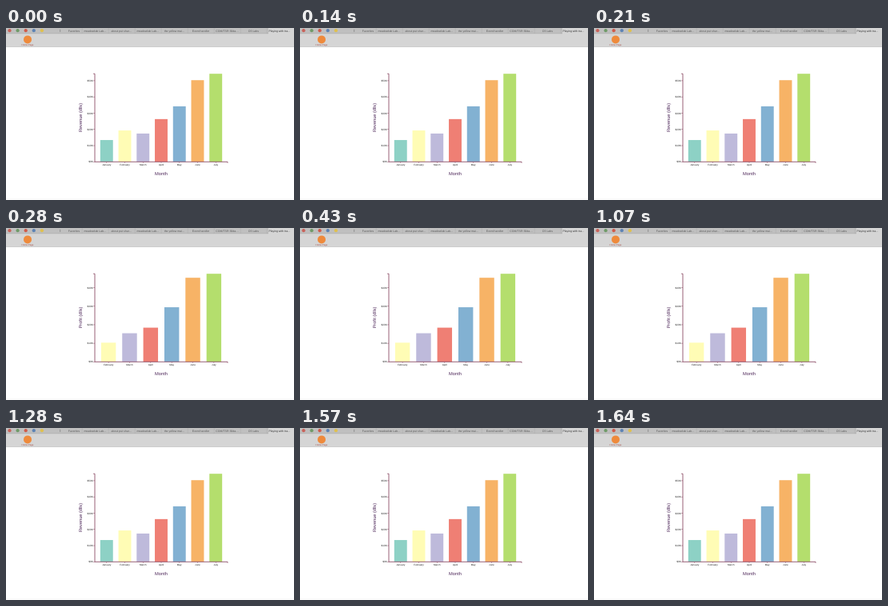
Recreate the animation shown at these times as an HTML page. Size 360 px wide and 215 px high, loop 1.93 s.

```html
<!DOCTYPE html>
<html lang="en">
<head>
<meta charset="utf-8">
<title>Monthly chart</title>
<style>
html, body { margin: 0; width: 100%; height: 100%; overflow: hidden; background: #fff; }
svg { display: block; width: 100vw; height: 100vh; }
text { font-family: "Liberation Sans", Arial, sans-serif; text-rendering: geometricPrecision; }
</style>
</head>
<body>
<svg id="stage" viewBox="0 0 360 215">
  <g id="browser"></g>
  <g id="chart"></g>
</svg>
<script>
const LOOP = 1930, TO_PROFIT = 280, TO_REVENUE = 1280;
const LEFT = 111, RIGHT = 277, TOP = 57.2, BASE = 167.3;
const AXIS = '#8d5068', INK = '#4b2457';

const months = ['January', 'February', 'March', 'April', 'May', 'June', 'July'];
const colors = ['#8dd1c5', '#fffcb5', '#bebadb', '#ef7f74', '#82b1d2', '#f7b366', '#b4de6d'];
const modes = {
  revenue: { title: 'Revenue (dlls)', first: 0, data: [13432, 19342, 17443, 26342, 34213, 50321, 54273] },
  profit: { title: 'Profit (dlls)', first: 1, data: [10342, 15423, 18432, 29434, 45343, 47492] }
};

function add(parent, tag, attrs, content) {
  const el = document.createElementNS('http://www.w3.org/2000/svg', tag);
  for (const key in attrs) el.setAttribute(key, attrs[key]);
  if (content) el.textContent = content;
  parent.appendChild(el);
  return el;
}
const rect = (g, x, y, width, height, fill) => add(g, 'rect', { x, y, width, height, fill });
const label = (g, x, y, size, text, fill, anchor = 'middle') =>
  add(g, 'text', { x, y, 'font-size': size, 'text-anchor': anchor, fill }, text);

function drawBrowser(g) {
  rect(g, 0, 0, 360, 215, '#fff');
  rect(g, 0, 0, 360, 24, '#d5d5d5');
  rect(g, 0, 0, 328, 7, '#bfbfbf');
  rect(g, 0, 6.6, 328, 0.6, '#a9a9a9');
  rect(g, 0, 23.4, 360, 0.6, '#c9c9c9');
  rect(g, 0, 213.6, 360, 0.6, '#f1f1ef');

  ['#c9625a', '#6f9b68', '#cf5a4a', '#5d83b5', '#dfc04e'].forEach((fill, i) =>
    add(g, 'circle', { cx: 4.5 + i * 10.1, cy: 3.2, r: 2.1, fill }));
  rect(g, 67.5, 1.8, 0.6, 3.2, '#777');

  const tabs = ['Favorites', 'meadowlab Lab…', 'about put shar…', 'meadowlab Lab…',
    'the yellow mai…', 'Event handler', 'COM/TSR 30da…', 'D3 Labs', 'Playing with tra…'];
  tabs.forEach((name, i) => {
    const x = i ? 111.5 + (i - 1) * 33 : 85;
    if (i) rect(g, x - 16.6, 0, 0.4, 7, '#a8a8a8');
    label(g, x + (i === 8 ? -0.5 : 0), 4.5, 3.5, name, i === 8 ? '#333' : '#555');
  });

  add(g, 'circle', { cx: 27, cy: 14.4, r: 5, fill: '#ee8a3c' });
  label(g, 27, 22.4, 2.8, 'Home Page', '#a3473f');
}

function drawChart(g, { title, first, data }) {
  g.replaceChildren();
  const gap = 0.3, count = data.length;
  const step = (RIGHT - LEFT) / (count + gap);
  const band = step * (1 - gap);
  const start = LEFT + step * gap;
  const max = Math.max(...data);
  const y = v => BASE - (BASE - TOP) * v / max;

  data.forEach((v, i) => {
    const x = start + i * step;
    rect(g, x, y(v), band, BASE - y(v), colors[first + i]);
    rect(g, x + band / 2 - 0.25, BASE, 0.5, 1.6, AXIS);
    label(g, x + band / 2, 172.1, 3.1, months[first + i], '#222');
  });
  for (let v = 0; v <= max; v += 10000) {
    rect(g, LEFT - 1.8, y(v) - 0.3, 1.8, 0.6, AXIS);
    label(g, LEFT - 2.2, y(v) + 1.1, 3.1, `$${v / 1000}K`, '#222', 'end');
  }
  add(g, 'path', {
    d: `M${LEFT - 1.8} ${TOP}H${LEFT}V${BASE}H${RIGHT}v1.4`,
    fill: 'none', stroke: AXIS, 'stroke-width': 0.9
  });
  label(g, 194, 184, 5.7, 'Month', INK);
  label(g, 0, 0, 5.6, title, INK).setAttribute('transform', 'translate(95.2 112) rotate(-90)');
}

const chart = document.getElementById('chart');
let shown = '';

function update(time) {
  const t = time % LOOP;
  const mode = t >= TO_PROFIT && t < TO_REVENUE ? 'profit' : 'revenue';
  if (mode !== shown) drawChart(chart, modes[shown = mode]);
}

function tick() {
  update(performance.now() - origin);
  requestAnimationFrame(tick);
}

drawBrowser(document.getElementById('browser'));
const origin = performance.now();
tick();
</script>
</body>
</html>
```
